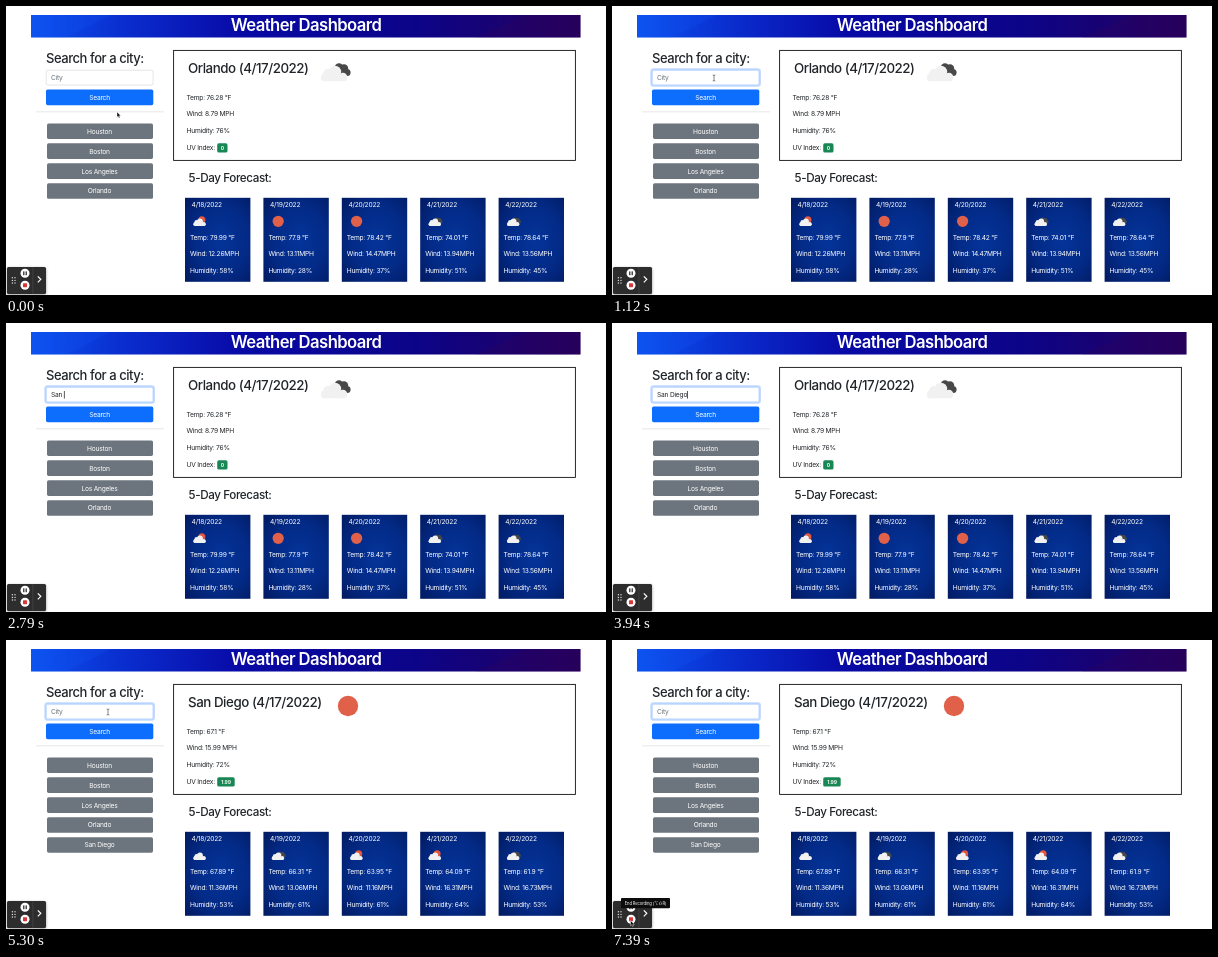
These frames come from a looping animation (600 px wide and 289 px high, 7.42 s). An HTML page:

```html
<!DOCTYPE html>
<html lang="en">
<head>
<meta charset="utf-8">
<title>Weather Dashboard</title>
<style>
  html, body { margin: 0; width: 100%; height: 100%; overflow: hidden; background: #fff; }
  svg { display: block; width: 100%; height: 100%; }
  text { font: 400 6.67px Inter, "Open Sans", sans-serif; letter-spacing: -.034em; fill: #212529; }
  .title { font-size: 16.67px; font-weight: 600; }
  .h2 { font-size: 13.33px; font-weight: 500; }
  .search { font-size: 13px; font-weight: 500; }
  .h3 { font-size: 11.67px; font-weight: 500; }
  .badge { font-size: 5px; font-weight: 700; }
  .tip { font-size: 4.2px; }
  .light { fill: #fff; }
  .mid { text-anchor: middle; }
</style>
</head>
<body>
<svg id="stage" viewBox="0 0 600 289">
  <defs>
    <linearGradient id="banner">
      <stop offset="0" stop-color="#0c52ee"/>
      <stop offset=".16" stop-color="#0a2fd0"/>
      <stop offset=".38" stop-color="#080aa6"/>
      <stop offset=".7" stop-color="#0c0488"/>
      <stop offset="1" stop-color="#25005c"/>
    </linearGradient>
    <radialGradient id="navy" cx=".55" cy=".5" r=".75">
      <stop offset="0" stop-color="#04349a"/>
      <stop offset=".55" stop-color="#032a86"/>
      <stop offset="1" stop-color="#021a60"/>
    </radialGradient>
    <filter id="soft" x="-30%" y="-30%" width="160%" height="160%">
      <feGaussianBlur stdDeviation="1.5"/>
    </filter>
    <g id="puff">
      <circle cx="-7" cy="1" r="5"/><circle cx="0" cy="-1" r="6.2"/>
      <circle cx="8" cy="4" r="4.2"/><circle cx="-10" cy="4.2" r="4"/>
      <rect x="-14" y="1.5" width="26" height="6.8" rx="3.4"/>
    </g>
    <g id="dark" fill="#484848">
      <circle cx="4" cy="-5.5" r="4.2"/><circle cx="9" cy="-4.5" r="4.2"/>
      <circle cx="12" cy="-.5" r="3.6"/><rect x="2" y="-5" width="11" height="6" rx="3"/>
    </g>
    <g id="cloud"><use href="#puff" fill="#f1f1f1"/></g>
    <g id="broken"><use href="#dark"/><use href="#puff" fill="#f1f1f1"/></g>
    <g id="few"><circle cx="4" cy="-5" r="7.5" fill="#e4573f"/><use href="#puff" fill="#f1f1f1"/></g>
    <g id="sun"><circle r="10.2" fill="#e0604a"/></g>
  </defs>
</svg>
<script>
const LOOP = 7420, FOCUS = 560, ENTER = 4620, LOADED = 4720, FIRST_ICON = 4920, TOOLTIP = 7150;
const KEYS = [2300, 2440, 2570, 2700, 3050, 3180, 3300, 3430, 3600];
const QUERY = 'San Diego';
// time, x, y of the pointer
const PATH = [[0, 111, 106], [140, 111, 106], [540, 102, 72], [5300, 102, 72],
  [5960, 254.5, 126.5], [6250, 254.5, 126.5], [7080, 18.5, 280.5], [LOOP, 18.5, 280.5]];

const REPORTS = [
  { name: 'Orlando', icon: 'broken', at: [329, 67], temp: '76.28', wind: '8.79', hum: 76, uv: '0', uvW: 10.3,
    days: [['79.99', '12.26', 58, 'few'], ['77.9', '13.11', 28, 'sun'], ['78.42', '14.47', 37, 'sun'],
      ['74.01', '13.94', 51, 'broken'], ['78.64', '13.56', 45, 'broken']] },
  { name: 'San Diego', icon: 'sun', at: [342, 66], temp: '67.1', wind: '15.99', hum: 72, uv: '1.99', uvW: 17.5,
    days: [['67.89', '11.36', 53, 'cloud'], ['66.31', '13.06', 61, 'broken'], ['63.95', '11.16', 61, 'few'],
      ['64.09', '16.31', 64, 'few'], ['61.9', '16.73', 53, 'broken']] }
];

const stage = document.getElementById('stage');

function add(tag, attrs, parent = stage) {
  const el = document.createElementNS('http://www.w3.org/2000/svg', tag);
  for (const k in attrs) el.setAttribute(k, attrs[k]);
  return parent.appendChild(el);
}
const box = (x, y, width, height, fill, parent, more) =>
  add('rect', { x, y, width, height, fill, ...more }, parent);
function label(x, y, str, cls = '', parent) {
  const el = add('text', { x, y, class: cls }, parent);
  el.textContent = str;
  return el;
}
const icon = (id, x, y, scale, parent) =>
  add('use', { href: '#' + id, transform: `translate(${x} ${y}) scale(${scale})` }, parent);
const show = (el, on) => el.setAttribute('visibility', on ? 'visible' : 'hidden');

function button(y, str, fill, parent, x = 41, w = 106) {
  box(x, y, w, 15.6, fill, parent, { rx: 1.7 });
  label(93.5, y + 10.2, str, 'light mid', parent);
}

function drawReport(r) {
  const g = add('g', {});
  label(182, 67, `${r.name} (4/17/2022)`, 'h2', g);
  icon(r.icon, ...r.at, 1, g);
  label(180.5, 94, `Temp: ${r.temp} °F`, '', g);
  label(180.5, 110.3, `Wind: ${r.wind} MPH`, '', g);
  label(180.5, 127.3, `Humidity: ${r.hum}%`, '', g);
  label(180.5, 144, 'UV Index:', '', g);
  box(211.2, 137.2, r.uvW, 9.4, '#198754', g, { rx: 1.7 });
  label(211.2 + r.uvW / 2, 143.8, r.uv, 'badge light mid', g);
  const icons = r.days.map(([temp, wind, hum, id], i) => {
    const x = 179 + 78.4 * i;
    label(x + 6.6, 200.6, `4/${18 + i}/2022`, 'light', g);
    label(x + 5, 233.5, `Temp: ${temp} °F`, 'light', g);
    label(x + 5, 249.8, `Wind: ${wind}MPH`, 'light', g);
    label(x + 5, 266.8, `Humidity: ${hum}%`, 'light', g);
    return id === 'sun' ? icon(id, x + 14.8, 215.3, .55, g) : icon(id, x + 15, 216, .47, g);
  });
  return { g, first: icons[0] };
}

// Page
box(25, 9, 549.5, 22.5, 'url(#banner)');
add('path', { d: 'M470 31.5L520 9H574.5V31.5Z', fill: '#30005a', opacity: .25 });
add('path', { d: 'M25 9H105L60 31.5H25Z', fill: '#1462ff', opacity: .15 });
label(300, 24.6, 'Weather Dashboard', 'title light mid');
label(40, 57, 'Search for a city:', 'search');
const ring = box(39.2, 63.2, 108.9, 16.8, 'none', stage,
  { rx: 2.4, stroke: '#0d6efd', 'stroke-opacity': .25, 'stroke-width': 1.7 });
const field = box(40.2, 64.2, 106.9, 14.8, '#fff', stage, { rx: 1.7, 'stroke-width': .6 });
const hint = label(45, 74, 'City');
hint.style.fill = '#6c757d';
const typed = label(45, 74, '');
const caret = box(45, 68, .7, 7.6, '#111');
button(83.6, 'Search', '#0d6efd', stage, 40, 107.3);
box(30, 105.6, 128, .6, '#d8d8d8');
['Houston', 'Boston', 'Los Angeles', 'Orlando'].forEach((c, i) => button(117.4 + 19.95 * i, c, '#6c757d'));
const saved = add('g', {});
button(197.2, QUERY, '#6c757d', saved);

box(167.6, 44.4, 401.8, 110, '#fff', stage, { stroke: '#111', 'stroke-width': .9 });
label(182.5, 175.6, '5-Day Forecast:', 'h3');
for (let i = 0; i < 5; i++) box(179 + 78.4 * i, 191.8, 65.4, 84, 'url(#navy)');
const [before, after] = REPORTS.map(drawReport);

// Recorder controls
box(1, 262, 39, 27, '#000', stage, { rx: 2, opacity: .4, filter: 'url(#soft)' });
box(1, 261, 39, 27, '#2d2d2d', stage, { rx: 1.5 });
box(26.6, 261, .6, 27, '#4a4a4a');
for (let i = 0; i < 6; i++) add('circle', { cx: 6.4 + 2.6 * (i % 2), cy: 271.8 + 2.6 * (i >> 1), r: .7, fill: '#ddd' });
for (const cy of [267.3, 279.2]) add('circle', { cx: 19, cy, r: 4.5, fill: '#fff' });
box(17.2, 265.4, 1.2, 3.8, '#222');
box(19.6, 265.4, 1.2, 3.8, '#222');
box(17, 277.2, 4, 4, '#d93838', stage, { rx: .6 });
add('path', { d: 'M31.8 270.3l3 3-3 3', fill: 'none', stroke: '#fff', 'stroke-width': 1.2 });
const tip = add('g', {});
box(9, 258, 49, 10.3, '#0c0c0c', tip, { rx: 1 });
label(33.5, 264.7, 'End Recording (⌥⇧R)', 'tip light mid', tip);

const arrow = add('path', { d: 'M0 0V5.2L1.2 4.2L2 6L3 5.5L2.2 3.8H3.8Z', fill: '#111', stroke: '#fff', 'stroke-width': .4 });
const beam = add('path', { d: 'M-1.3 -3Q0 -3 0 -2.2V2.2Q0 3 -1.3 3M1.3 -3Q0 -3 0 -2.2M0 2.2Q0 3 1.3 3',
  fill: 'none', stroke: '#333', 'stroke-width': .6 });

function pointerAt(t) {
  const i = PATH.findIndex((p, n) => n && t <= p[0]);
  const [t0, x0, y0] = PATH[i - 1], [t1, x1, y1] = PATH[i];
  const u = (t - t0) / (t1 - t0), e = u * u * (3 - 2 * u);
  return [x0 + (x1 - x0) * e, y0 + (y1 - y0) * e];
}

function draw(t) {
  const focused = t >= FOCUS, sent = t >= ENTER, loaded = t >= LOADED;
  const count = sent ? 0 : KEYS.filter(k => k <= t).length;
  typed.textContent = QUERY.slice(0, count).replace(' ', '\u00a0');
  show(hint, !count);
  show(ring, focused);
  field.setAttribute('stroke', focused ? '#86b7fe' : '#ced4da');

  const lastInput = sent ? ENTER : count ? KEYS[count - 1] : FOCUS;
  show(caret, focused && (t - lastInput) % 1000 < 500);
  caret.setAttribute('x', 45 + (count ? typed.getComputedTextLength() : 0));

  show(before.g, !loaded);
  show(after.g, loaded);
  show(after.first, t >= FIRST_ICON);
  show(saved, loaded);
  show(tip, t >= TOOLTIP);

  const [x, y] = pointerAt(t);
  const hidden = t >= KEYS[0] && t < 5300;
  const overField = x > 40 && x < 147 && y > 64 && y < 79;
  for (const el of [arrow, beam]) el.setAttribute('transform', `translate(${x} ${y})`);
  show(arrow, !hidden && !overField);
  show(beam, !hidden && overField);
}

const start = performance.now();
function tick() {
  draw((performance.now() - start) % LOOP);
  requestAnimationFrame(tick);
}
tick();
</script>
</body>
</html>
```
